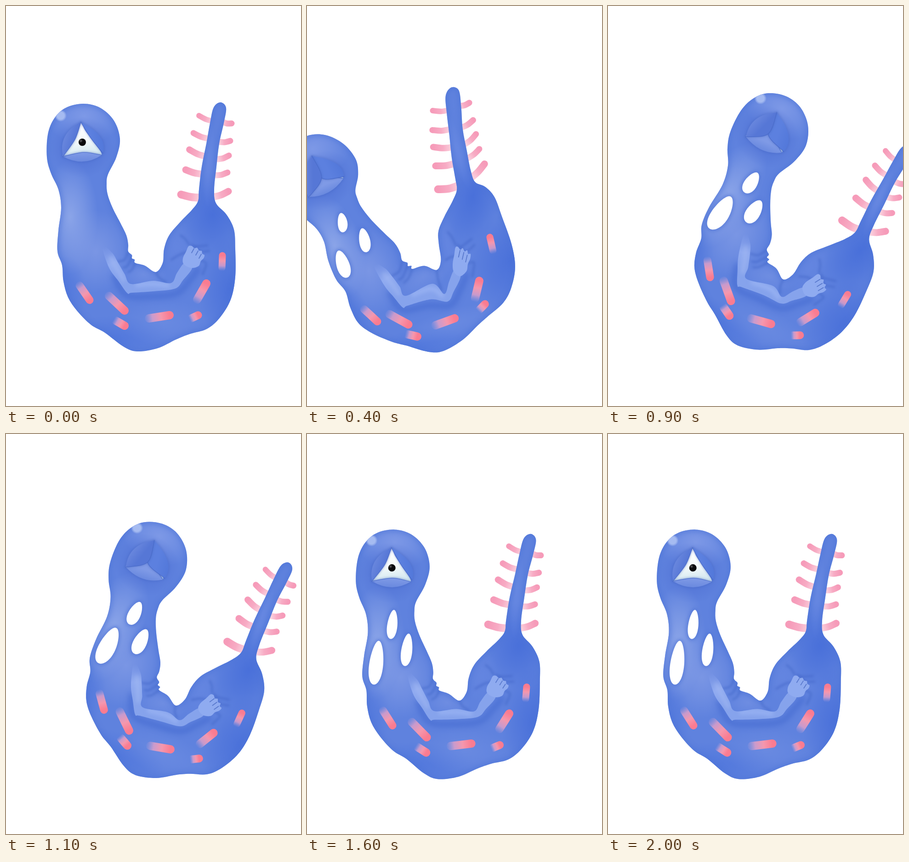
Write an HTML page with a canvas that moves like this. It is 642x872 px and loops after 2500 ms.

```html
<!DOCTYPE html>
<html lang="en">
<head>
<meta charset="utf-8">
<title>Swaying creature</title>
<style>
html, body { margin: 0; width: 100%; height: 100%; overflow: hidden; background: #fff; }
canvas { display: block; width: 642px; height: 872px; }
</style>
</head>
<body>
<canvas id="c" width="642" height="872"></canvas>
<script>
const ctx = document.getElementById('c').getContext('2d');
const clamp = v => Math.max(0, Math.min(1, v));

// Landmarks: rest x,y, full left lean x,y, full right lean x,y
const headPins = [
  [168, 213, 0, 283, 388, 197], [248, 290, 106, 334, 431, 304],
  [89, 300, -39, 402, 279, 246], [165, 300, 31, 374, 349, 277],
  [219, 385, 108, 415, 362, 380], [114, 400, 21, 486, 261, 348]
];
const trunkPins = [
  [250, 475, 168, 495, 354, 472], [172, 420, 77, 472, 312, 385],
  [141, 505, 78, 563, 246, 450], [114, 490, 46, 555, 219, 440],
  [122, 565, 84, 622, 203, 507], [135, 635, 112, 692, 188, 570],
  [185, 695, 186, 732, 216, 645], [285, 753, 297, 752, 282, 740],
  [370, 727, 372, 696, 370, 746], [437, 704, 427, 647, 437, 750],
  [326, 580, 284, 573, 383, 596], [275, 545, 220, 562, 350, 544],
  [268, 618, 210, 648, 288, 604], [367, 610, 303, 640, 378, 643]
];
const tailPins = [
  [499, 558, 435, 488, 551, 647], [490, 475, 399, 408, 577, 566],
  [489, 640, 453, 569, 508, 711], [344, 530, 287, 518, 420, 558],
  [407, 549, 333, 564, 445, 615], [420, 425, 328, 400, 540, 494],
  [453, 425, 362, 381, 567, 502], [447, 322, 328, 297, 601, 402],
  [468, 210, 315, 177, 656, 304]
];
const pins = [...headPins, ...trunkPins, ...tailPins];

// Thin-plate spline through the landmarks
const kernel = (dx, dy) => {
  const r = (dx * dx + dy * dy) / 1e4;
  return r ? r * Math.log(r) : 0;
};
const basis = (x, y) => [...pins.map(q => kernel(x - q[0], y - q[1])), 1, x / 100, y / 100];

function solve(m, n) {
  for (let i = 0; i < n; i++) {
    let k = i;
    for (let j = i; j < n; j++) if (Math.abs(m[j][i]) > Math.abs(m[k][i])) k = j;
    [m[i], m[k]] = [m[k], m[i]];
    const d = m[i][i];
    m[i] = m[i].map(v => v / d);
    for (let j = 0; j < n; j++) {
      const f = m[j][i];
      if (j !== i && f) m[j] = m[j].map((v, c) => v - f * m[i][c]);
    }
  }
  return m.map(row => row.slice(n));
}

const size = pins.length;
const rows = pins.map((q, i) => {
  const row = basis(q[0], q[1]);
  row[i] += 0.06;
  return [...row, q[2] - q[0], q[3] - q[1], q[4] - q[0], q[5] - q[1]];
});
for (const f of [() => 1, q => q[0] / 100, q => q[1] / 100])
  rows.push([...pins.map(f), 0, 0, 0, 0, 0, 0, 0]);
const weights = solve(rows, size + 3);

let lean = 0;

function warp(x, y) {
  if (!lean) return [x, y];
  const d = [0, 0, 0, 0];
  basis(x, y).forEach((b, i) => weights[i].forEach((w, k) => { d[k] += b * w; }));
  const mix = (l, r) => lean * (r - l) / 2 + lean * lean * (r + l) / 2;
  return [x + mix(d[0], d[2]), y + mix(d[1], d[3])];
}

function warpAll(flat) {
  const out = [];
  for (let i = 0; i < flat.length; i += 2) out.push(warp(flat[i], flat[i + 1]));
  return out;
}

// Smooth path through warped points
function curve(flat, closed) {
  const p = warpAll(flat), n = p.length, path = new Path2D();
  const at = i => closed ? p[(i + n) % n] : p[Math.max(0, Math.min(n - 1, i))];
  path.moveTo(...p[0]);
  for (let i = 0; i < (closed ? n : n - 1); i++) {
    const [a, b, c, d] = [at(i - 1), at(i), at(i + 1), at(i + 2)];
    path.bezierCurveTo(
      b[0] + (c[0] - a[0]) / 6, b[1] + (c[1] - a[1]) / 6,
      c[0] - (d[0] - b[0]) / 6, c[1] - (d[1] - b[1]) / 6, c[0], c[1]);
  }
  if (closed) path.closePath();
  return path;
}

function stroke(path, color, width, blur = 0, alpha = 1) {
  ctx.save();
  ctx.filter = blur ? `blur(${blur}px)` : 'none';
  ctx.globalAlpha = alpha;
  ctx.strokeStyle = color;
  ctx.lineWidth = width;
  ctx.lineCap = ctx.lineJoin = 'round';
  ctx.stroke(path);
  ctx.restore();
}

function ramp(x0, y0, x1, y1, ...colors) {
  const g = ctx.createLinearGradient(...warp(x0, y0), ...warp(x1, y1));
  colors.forEach((c, i) => g.addColorStop(i / (colors.length - 1), c));
  return g;
}

// Local frame following the warp, in units of rx and ry
function place(x, y, rx, ry, draw) {
  const o = warp(x, y), u = warp(x + 8, y), v = warp(x, y + 8);
  ctx.save();
  ctx.transform((u[0] - o[0]) * rx / 8, (u[1] - o[1]) * rx / 8,
    (v[0] - o[0]) * ry / 8, (v[1] - o[1]) * ry / 8, o[0], o[1]);
  draw();
  ctx.restore();
}

function glow(x, y, rx, ry, rgb, alpha, core = 0) {
  place(x, y, rx, ry, () => {
    const g = ctx.createRadialGradient(0, 0, core, 0, 0, 1);
    g.addColorStop(0, `rgba(${rgb},${alpha})`);
    g.addColorStop(0.5, `rgba(${rgb},${alpha * 0.55})`);
    g.addColorStop(1, `rgba(${rgb},0)`);
    ctx.fillStyle = g;
    ctx.fillRect(-1, -1, 2, 2);
  });
}

const bodyLine = [
  168, 213, 205, 222, 235, 250, 248, 290, 240, 330, 222, 367, 219, 387, 221, 410, 232, 440,
  250, 475, 262, 500, 266, 520, 266, 535, 274, 543, 274, 550, 280, 553, 281, 560, 302, 566,
  326, 580, 341, 560, 344, 530, 355, 500, 380, 470, 405, 444, 418, 425, 420, 400, 426, 350,
  436, 300, 444, 255, 452, 221, 467, 210, 479, 222, 474, 255, 464, 300, 458, 350, 453, 400,
  457, 430, 480, 455, 496, 487, 499, 530, 499, 590, 489, 640, 465, 680, 437, 704, 400, 715,
  370, 727, 330, 746, 285, 753, 255, 742, 215, 712, 185, 695, 155, 665, 135, 635, 125, 600,
  122, 565, 112, 535, 114, 490, 120, 440, 114, 400, 98, 365, 89, 330, 91, 280, 105, 245, 130, 222
];

// Outer end, inner end, width
const ribs = [
  [420, 239, 450, 251, 12], [408, 277, 440, 289, 13], [399, 313, 434, 328, 14],
  [391, 357, 430, 367, 15], [381, 411, 425, 418, 17],
  [491, 256, 470, 252, 13], [488, 294, 462, 296, 13], [485, 326, 460, 334, 13],
  [482, 363, 455, 369, 13], [484, 404, 452, 416, 15]
];

// Faded end, bright end, width
const marks = [
  [160, 609, 182, 641, 17], [224, 632, 258, 664, 18], [239, 686, 258, 697, 18],
  [311, 681, 356, 674, 18], [416, 640, 436, 605, 18], [403, 681, 418, 674, 17],
  [470, 571, 471, 544, 15]
];

const shades = [
  [170, 240, 85, 60, '138,162,234', 0.7], [140, 460, 60, 125, '146,170,234', 0.85],
  [195, 535, 75, 90, '140,163,232', 0.6], [450, 455, 75, 95, '66,106,216', 0.75],
  [490, 620, 70, 120, '66,106,216', 0.7], [235, 725, 130, 50, '74,114,220', 0.6],
  [130, 625, 45, 80, '74,114,220', 0.5], [345, 690, 100, 50, '116,146,228', 0.45],
  [300, 585, 50, 32, '120,148,228', 0.6], [372, 525, 38, 60, '104,136,226', 0.5],
  [440, 330, 16, 110, '116,146,232', 0.4], [165, 308, 72, 66, '70,102,205', 0.6]
];

const folds = [
  [398, 520, 390, 508, 380, 500], [404, 520, 412, 524, 438, 522],
  [410, 525, 425, 535, 442, 534], [394, 537, 378, 542, 360, 553],
  [425, 555, 436, 562, 428, 585], [326, 580, 333, 592, 348, 602],
  [266, 536, 258, 553, 244, 557], [274, 548, 264, 567, 256, 570],
  [281, 560, 274, 575, 266, 580]
];

function drawRibs() {
  for (const [x0, y0, x1, y1, w] of ribs) {
    const path = curve([x0, y0, (x0 + x1) / 2, (y0 + y1) / 2 + 2, x1, y1]);
    stroke(path, ramp(x0, y0, x1, y1, '#f69bb9', '#f7abc4', '#fbd3df'), w);
  }
}

function drawBody() {
  const path = curve(bodyLine, true);
  ctx.fillStyle = '#5f82de';
  ctx.fill(path);
  ctx.save();
  ctx.clip(path);
  shades.forEach(s => glow(...s));
  stroke(path, '#4c73d8', 9, 5, 0.55);
  folds.forEach(f => stroke(curve(f), '#4367c8', 4, 2.5, 0.6));
  stroke(curve([236, 590, 262, 630, 315, 633, 372, 626, 400, 598, 418, 574]), '#4268cf', 12, 6, 0.6);
  glow(119, 239, 13, 13, '169,190,242', 0.95, 0.6);
  ctx.restore();
}

function drawMarks() {
  for (const [x0, y0, x1, y1, w] of marks)
    stroke(curve([x0, y0, x1, y1]),
      ramp(x0 - (x1 - x0) * 0.25, y0 - (y1 - y0) * 0.25, x1, y1,
        'rgba(170,160,222,0)', 'rgba(226,160,200,.8)', '#f597ad', '#fa7c91'), w, 0.6);
}

function drawArm() {
  const arm = curve([
    209, 522, 224, 570, 245, 600, 264, 626, 274, 625, 320, 622, 368, 616, 385, 598, 405, 571,
    389, 560, 372, 582, 359, 604, 320, 599, 272, 606, 258, 584, 243, 558, 231, 538
  ], true);
  ctx.fillStyle = ramp(215, 525, 250, 595, 'rgba(138,165,238,0)', 'rgba(148,174,242,.9)', '#86a3ec');
  ctx.fill(arm);
  ctx.save();
  ctx.clip(arm);
  stroke(curve([285, 608, 320, 606, 352, 609]), '#9db6f4', 9, 4, 0.8);
  stroke(curve([228, 550, 243, 575, 256, 597]), '#a4baf2', 9, 4, 0.6);
  ctx.restore();
  ctx.fillStyle = '#8fabf0';
  ctx.fill(curve([
    392, 535, 397, 524, 404, 523, 410, 528, 416, 527, 420, 533, 426, 534,
    427, 540, 432, 543, 430, 550, 424, 556, 419, 567, 403, 571, 387, 563, 385, 550
  ], true));
  for (const [x, y] of [[409, 529], [418, 534], [425, 541]])
    stroke(curve([x, y, x - 5, y + 9]), '#5878cc', 1.8, 0.4);
}

function drawHoles() {
  if (!lean) return;
  const q = Math.abs(lean);
  const [sw, sh] = lean < 0 ? [0.35 + 0.65 * q, 0.55 + 0.1 * q] : [0.96 + 0.35 * q, 1.02 - 0.2 * q];
  for (const [x, y, w, h] of [[172, 420, 11, 32], [206, 474, 12, 36], [141, 505, 15, 48]]) {
    const path = new Path2D();
    place(x, y, 1, 1, () => {
      const m = ctx.getTransform(), ring = new Path2D();
      for (let a = 0; a < 6.28; a += 0.1) {
        const s = Math.sin(a), c = Math.cos(a);
        ring.lineTo(w * sw * (c * (1 + 0.18 * s) - 0.2 * s), h * sh * s);
      }
      ring.closePath();
      path.addPath(ring, m);
    });
    stroke(path, '#5075d6', 8, 3, 0.6);
    ctx.fillStyle = '#fff';
    ctx.fill(path);
  }
}

// Corners, outer bulge, open inner edge, colours
const lids = [
  [124, 328, 208, 325, 168, 352, 168, 319, '#7f9ae6', '#5d7fda'],
  [163, 253, 211, 321, 222, 283, 184, 287, '#5c80df', '#4f75d8'],
  [124, 328, 163, 253, 113, 278, 150, 291, '#5677d6', '#7490e2']
];

function drawEye() {
  const shut = clamp((Math.abs(lean) - 0.25) / 0.5);
  const hub = [165, 302];
  ctx.fillStyle = ramp(160, 260, 170, 328, '#ffffff', '#f4fafb', '#cfe5ee');
  ctx.fill(curve([163, 253, 172, 271, 188, 293, 208, 325, 168, 322, 124, 328, 145, 293, 157, 271], true));
  place(166, 297, 8, 8, () => {
    ctx.fillStyle = '#0b0b0d';
    ctx.beginPath();
    ctx.arc(0, 0, 1, 0, 7);
    ctx.fill();
  });
  glow(163, 294, 4, 4, '120,120,125', 0.8);
  for (const [ax, ay, bx, by, ox, oy, mx, my, near, far] of lids) {
    const px = (ax + bx) / 2, py = (ay + by) / 2;
    // A doubled control reaches three quarters of the way from the chord
    const pull = (mid, edge, goal) => mid + (edge + (goal - edge) * shut - mid) * 4 / 3;
    const a = warp(ax, ay), b = warp(bx, by), o = warp(ox, oy);
    const m = warp(pull(px, mx, hub[0]), pull(py, my, hub[1]));
    const inner = new Path2D();
    inner.moveTo(...a);
    inner.bezierCurveTo(...m, ...m, ...b);
    const lid = new Path2D(inner);
    lid.quadraticCurveTo(...o, ...a);
    stroke(lid, '#4566c4', 3, 2, 0.5);
    ctx.fillStyle = ramp(mx, my, ox, oy, near, far);
    ctx.fill(lid);
    stroke(inner, '#4a6bc8', 1.6, 0.7, 0.75);
  }
}

// Lean for each tenth of a second
function leanAt(n) {
  if (n <= 6) return n % 6 ? -1.155 * Math.sin(Math.PI * n / 6) : 0;
  if (n < 13) return Math.sin(Math.PI * (n - 6) / 7) / Math.sin(Math.PI * 3 / 7);
  const wave = -Math.round(Math.sin(Math.PI / 2 * (Math.min(n, 20) - 13)));
  return wave * (wave < 0 ? 0.17 : 0.115) || 0;
}

function draw() {
  ctx.fillStyle = '#fff';
  ctx.fillRect(0, 0, 642, 872);
  drawRibs();
  drawBody();
  drawMarks();
  drawArm();
  drawHoles();
  drawEye();
}

const start = performance.now();
let last = -1;
function tick() {
  const step = Math.floor((performance.now() - start) % 2500 / 100);
  if (step !== last) {
    last = step;
    lean = leanAt(step);
    draw();
  }
  requestAnimationFrame(tick);
}
tick();
</script>
</body>
</html>
```
